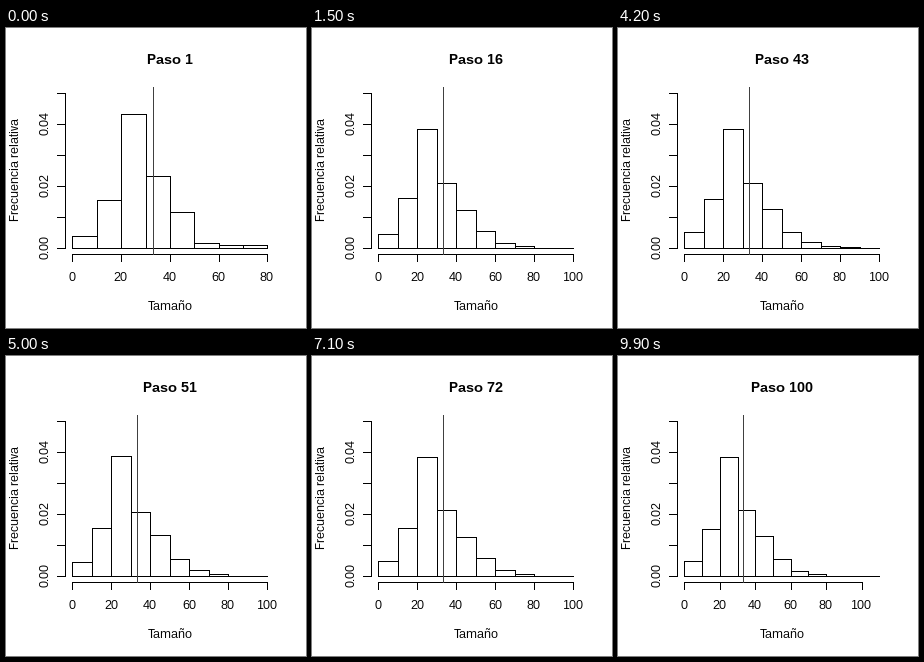
Recreate the animation shown at these times as a matplotlib script. Size 300 by 300 pixels, loop 10000 ms.

```python
import numpy as np
import matplotlib.pyplot as plt
from matplotlib.animation import FuncAnimation
from matplotlib.collections import LineCollection

SIZE, DPI, STEPS = 300, 100, 100
PX = 72 / DPI
LEFT, RIGHT, TOP, BOTTOM = 59.04, 269.76, 59.04, 226.56
X0, X_LEN = 66.84, 195.1
Y0, Y_LEN, Y_MAX = 220.35, 155.1, 0.05
TICK = 7.2
MEAN = 33.1
WIDTH = 10

plt.rcParams.update({
    "font.family": "Liberation Sans",
    "text.hinting": "native",
    "text.hinting_factor": 1,
})


def histogram(step):
    """Axis span and densities of the sample drawn at this step."""
    rng = np.random.default_rng(step)
    # a small, peaked sample opens; large ones follow
    size, peak = (130, .25) if step == 1 else (13000, .16)
    # now and then an outlier widens the axis
    span = 80 if step == 1 else 100 if step % 5 else 110

    n_peak = int(size * peak)
    core = rng.normal(25, 2.5, n_peak)
    spread = abs(rng.normal(10.7, 3.6, size - n_peak)) ** (1 / .7)
    counts, _ = np.histogram(np.concatenate([core, spread]),
                             bins=np.arange(0, span + 1, WIDTH))
    return span, counts / (size * WIDTH)


def seg(xa, ya, xb, yb):
    """One-pixel line between the centres of two pixels."""
    return [(int(xa) + .5, int(ya) + .5), (int(xb) + .5, int(yb) + .5)]


def x_pos(value, span):
    return X0 + X_LEN * value / span


def y_pos(density):
    return Y0 - Y_LEN * density / Y_MAX


def lines(color="black"):
    coll = LineCollection([], colors=color, linewidths=PX,
                          capstyle="projecting", snap=False)
    ax.add_collection(coll, autolim=False)
    return coll


def label(x, y, text, size=12, **kw):
    return ax.text(x, y, text, fontsize=size * PX, ha="center",
                   va="baseline", rotation_mode="anchor", **kw)


fig = plt.figure(figsize=(SIZE / DPI, SIZE / DPI), dpi=DPI, facecolor="white")
ax = fig.add_axes([0, 0, 1, 1])
ax.set_xlim(0, SIZE)
ax.set_ylim(SIZE, 0)
ax.axis("off")

y_axis = lines()
y_axis.set_segments(
    [seg(LEFT, y_pos(0), LEFT, y_pos(Y_MAX))]
    + [seg(LEFT - TICK, y_pos(v / 100), LEFT, y_pos(v / 100)) for v in range(6)])
for v in (0, .02, .04):
    label(43, y_pos(v) - 1, f"{v:.2f}", rotation=90)

mid_x, mid_y = (LEFT + RIGHT) / 2, (TOP + BOTTOM) / 2
label(13, mid_y - 1, "Frecuencia relativa", rotation=90)
label(mid_x - .5, 282, "Tamaño")
title = label(mid_x, 36, "", 14, weight="bold")
ticks = [label(X0, 253, str(v)) for v in range(0, 101, 20)]
bars, x_axis, mean_line = lines(), lines(), lines("#404040")


def update(i):
    step = i + 1
    span, dens = histogram(step)
    title.set_text(f"Paso {step}")

    outline = []
    for k, d in enumerate(dens):
        xa, xb = x_pos(WIDTH * k, span), x_pos(WIDTH * (k + 1), span)
        top = y_pos(d)
        outline += [seg(xa, Y0, xb, Y0), seg(xa, top, xb, top),
                    seg(xa, top, xa, Y0), seg(xb, top, xb, Y0)]
    bars.set_segments(outline)

    last = span // 20 * 20
    axis = [seg(X0, BOTTOM, x_pos(last, span), BOTTOM)]
    for k, text in enumerate(ticks):
        value = 20 * k
        text.set_visible(value <= last)
        if value <= last:
            x = x_pos(value, span)
            text.set_x(x - 1)
            axis.append(seg(x, BOTTOM, x, BOTTOM + TICK))
    x_axis.set_segments(axis)

    x = x_pos(MEAN, span)
    mean_line.set_segments([seg(x, TOP, x, BOTTOM)])
    return [title, bars, x_axis, mean_line, *ticks]


anim = FuncAnimation(fig, update, frames=STEPS, interval=100,
                     repeat=True, repeat_delay=0, blit=False)
plt.show()
```
